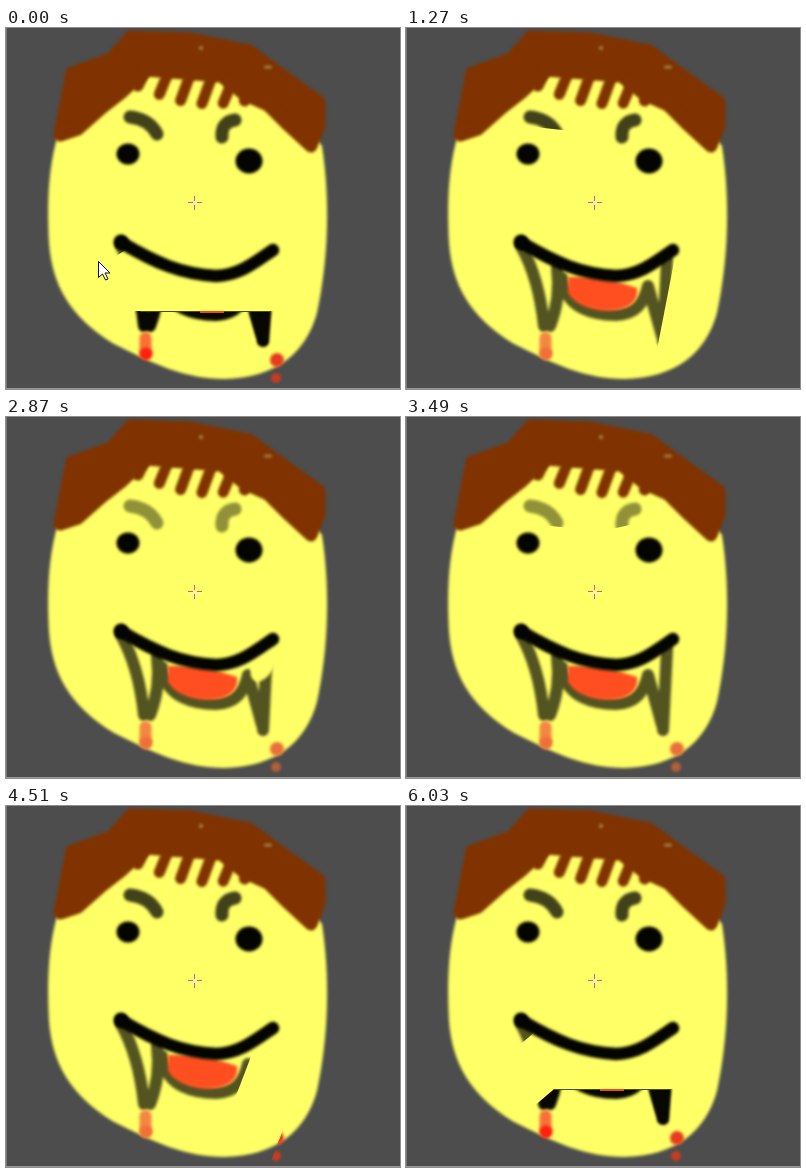
An HTML page with a canvas that plays this animation: 394x361 px, repeating every 6130 ms.

```html
<!DOCTYPE html>
<html lang="en">
<head>
<meta charset="utf-8">
<title>Vampire doodle</title>
<style>
html, body { margin: 0; width: 100%; height: 100%; overflow: hidden; background: #4d4d4d; }
canvas { display: block; }
</style>
</head>
<body>
<canvas id="stage" width="394" height="361"></canvas>
<script>
const ctx = document.getElementById('stage').getContext('2d');
const LOOP = 6130, YELLOW = '#ffff66', HAIR = '#803300', BLACK = '#050500';
const BOLD_GAP = 56, SOFT = 'blur(1.6px)';
const path = d => new Path2D(d);

const face = path('M51 110C40 150 42 190 43 215C46 255 62 288 108 316C150 337 180 351 218 351C270 350 300 325 311 285C323 230 324 170 316 118L262 50L125 30Z');
const hair = path('M54 107L66 45L105 31L125 9L185 11L243 23L263 38L313 74V97L305 118L280 95L262 77L238 66L215 48L140 42L116 64L98 78L72 101Z');
const smile = path('M116 215C150 235 175 246 210 248C234 247 248 235 267 222');
const browL = path('M124 89Q143 91 151 106');
const browR = path('M229 92Q215 94 216 109');
const fangs = path('M115 218Q133 250 138 298M151 240Q155 270 144 298M156 250C160 282 190 287 210 287C230 286 238 275 242 258L256 308M261 232L257 313');
const tongue = path('M162 249Q196 247 231 260C236 290 176 289 162 265Z');

const clamp = k => Math.min(1, Math.max(0, k));
const mix = (a, b, k) => a + (b - a) * k;

// Wipe line of the mouth: [time, x, y, direction in degrees]
const wipe = [[60, 189, 175, 146], [1270, 257, 290, 101], [1520, 292, 300, 101],
  [4100, 292, 300, 101], [5040, 189, 175, 123.7], [6030, 189, 175, 139.7]];

function wipeAt(t) {
  const next = wipe.findIndex((key, i) => i && t <= key[0]);
  const q = wipe.at(next), p = wipe.at(next < 0 ? -2 : next - 1);
  const k = clamp((t - p[0]) / (q[0] - p[0]));
  return [1, 2, 3].map(n => mix(p[n], q[n], k));
}

function halfPlane(x, y, deg, offset = 0) {
  const area = new Path2D(), half = new Path2D();
  half.rect(-900, offset, 1800, 900);
  area.addPath(half, new DOMMatrix().translate(x, y).rotate(deg));
  return area;
}

function line(p, color, width) {
  ctx.strokeStyle = color;
  ctx.lineWidth = width;
  ctx.stroke(p);
}

function fill(p, color) {
  ctx.fillStyle = color;
  ctx.fill(p);
}

function spot(x, y, rx, ry, color, tilt = 0) {
  ctx.beginPath();
  ctx.ellipse(x, y, rx, ry, tilt, 0, 7);
  ctx.fillStyle = color;
  ctx.fill();
}

function clipped(areas, draw) {
  ctx.save();
  areas.forEach(area => ctx.clip(area));
  draw();
  ctx.restore();
}

function drawHead() {
  ctx.filter = 'none';
  ctx.fillStyle = '#4d4d4d';
  ctx.fillRect(0, 0, 394, 361);
  ctx.filter = SOFT;
  fill(face, YELLOW);
  fill(hair, HAIR);
  line(hair, HAIR, 13);
  for (let i = 0; i < 6; i++) {
    const x = 132 + 21.3 * i, y = 58 + 3 * i;
    line(path(`M${x + 12} ${y - 24}L${x} ${y + 9 * Math.sin(i * .63)}`), HAIR, 11);
  }
  spot(195, 20, 2, 2, '#b08a3c');
  spot(262, 39, 4, 1.5, '#a08a48');
  spot(122, 126, 11.5, 10.5, BLACK);
  spot(243, 133, 13.5, 12.5, BLACK);
}

// Wiped off upwards, then drawn again in the other shade, around each swap
function drawBrow(p, x, tilt, t, toPale, toDark) {
  const dark = t < toPale || t > toDark;
  const shown = clamp(Math.min(Math.abs(t - toPale), Math.abs(t - toDark)) / 390);
  clipped([halfPlane(x, mix(80, 118, shown), 180 + tilt)],
    () => line(p, `rgba(0,0,0,${dark ? .74 : .43})`, 13));
}

function drawBlood(left, right, last) {
  line(path('M139.5 310V324'), left[0], 12);
  spot(140, 326, 6.5, 6.5, left[1]);
  spot(271, 332, 7, 7, right);
  spot(270, 350, 5, 5, last);
}

function drawMouth(t) {
  const [x, y, deg] = wipeAt(t);
  clipped([halfPlane(x, y, deg)], () => {
    line(fangs, 'rgba(0,0,0,.67)', 12);
    fill(tongue, '#ff4f20');
    drawBlood(['#f38643', '#f07038'], '#e8703a', '#b06038');
  });
  clipped([path('M0 283H394V361H0Z'), halfPlane(x, y, deg + 180, BOLD_GAP)], () => {
    line(fangs, '#080800', 12);
    fill(path('M243 283H265L261 316H253Z'), '#080800');
    drawBlood(['#f87035', '#ff2010'], '#e63c20', '#c83c22');
    ctx.filter = 'none';
    ctx.fillStyle = '#4c4c1c';
    ctx.fillRect(134, 283, 131, 1);
    ctx.fillStyle = '#f04a20';
    ctx.fillRect(194, 283, 24, 2);
  });
}

// An erased spot grows as it crosses the tongue to the right fang
function drawEraser(t) {
  const k = (t - 2010) / 860;
  if (k > -.1 && k < 1.35) spot(183 + 75 * k, 256 - 10 * k, 4 + 7 * k, 9 + 11 * k, YELLOW, .5 * k);
}

function drawPointer(t) {
  ctx.filter = 'none';
  ctx.lineCap = 'butt';
  line(path('M182 175.5H196M189.5 168V182'), '#fff0d8', 1);
  line(path('M182 174.5H187M191 174.5H196M188.5 168V173M188.5 177V182'), '#e0604a', 1);
  if (t < 900) {
    const x = 92.5 - Math.max(0, t - 730) / 2;
    const arrow = path(`M${x} 233.5v16l4-3.5 3 6 2.5-1-3-6h5Z`);
    fill(arrow, '#fff');
    line(arrow, '#111', 1);
  }
  ctx.fillStyle = '#777';
  ctx.fillRect(0, 0, 1, 361);
  ctx.fillStyle = '#999';
  ctx.fillRect(0, 360, 394, 1);
}

function frame(now) {
  const t = now % LOOP;
  ctx.lineCap = ctx.lineJoin = 'round';
  drawHead();
  drawBrow(browL, 137, 6, t, 1475, 3780);
  drawBrow(browR, 223, -12.5, t, 2200, 3780);
  drawMouth(t);
  drawEraser(t);
  line(smile, BLACK, 12.5);
  spot(115, 214, 7.5, 7.5, BLACK);
  drawPointer(t);
  requestAnimationFrame(frame);
}
requestAnimationFrame(frame);
</script>
</body>
</html>
```
